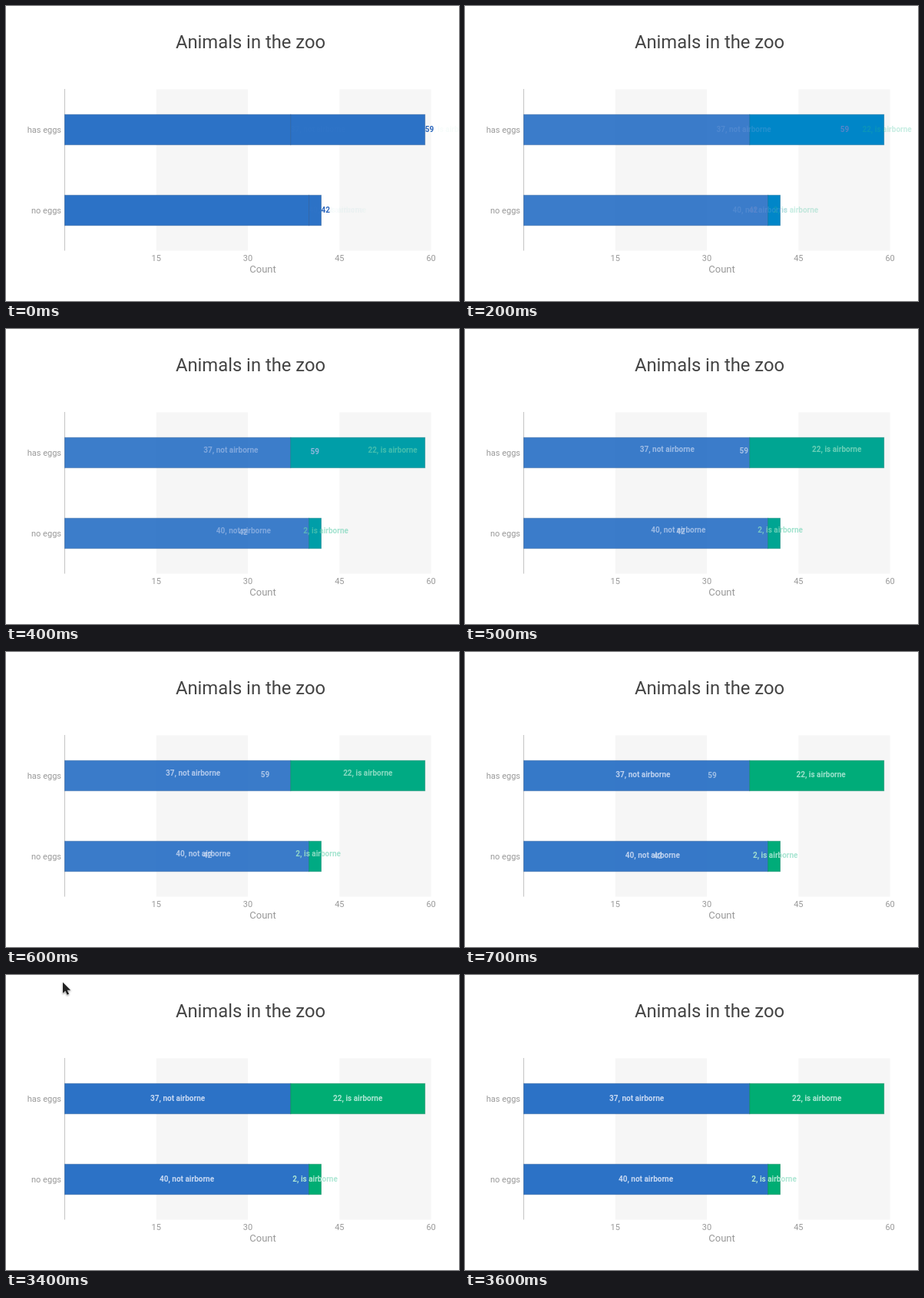
Recreate the animation shown at these times as an HTML page. Size 590 px wide and 384 px high, loop 4000 ms.

```html
<!DOCTYPE html>
<html lang="en">
<head>
<meta charset="utf-8">
<title>Animals in the zoo</title>
<style>
  html, body { margin: 0; width: 100%; height: 100%; overflow: hidden; background: #fff; }
  svg { display: block; width: 590px; height: 384px; font-family: Roboto, sans-serif; }
  .axis { font-size: 11px; fill: #999; text-anchor: middle; }
  .row { text-anchor: end; }
  .label { font-size: 10px; font-weight: 600; text-anchor: middle; }
  #bars { stroke-opacity: .5; }
  #cursor { filter: drop-shadow(.5px 1px .8px rgba(0, 0, 0, .4)); }
</style>
</head>
<body>
<svg viewBox="0 0 590 384">
  <rect width="590" height="384" fill="#fff"/>
  <g id="stripes" fill="#f6f6f6"></g>
  <path d="M76.5 108V318.5" stroke="#c4c4c4"/>
  <text x="318.5" y="55" font-size="23.8" fill="#444" text-anchor="middle">Animals in the zoo</text>
  <g id="axis" class="axis">
    <text x="334.5" y="347" font-size="13">Count</text>
  </g>
  <g id="bars"></g>
  <g id="labels"></g>
  <path id="cursor" d="M0 0V14.2L3.3 11.2L5.6 16.3L8.1 15.2L5.8 10.2H10.2Z"
        fill="#222" stroke="#fff" paint-order="stroke"/>
</svg>
<script>
const LOOP = 4000, STEP = 100, MOVE = 990, DURATION = 1294;
const BLUE = 'rgb(44 114 198)', GREEN = 'rgb(0 173 115)';
const BAND = 105, TOP = 108.5, BAR = 39.4;

const $ = id => document.getElementById(id);
const scaleX = count => 76.5 + count * 7.952;
const rowY = row => TOP + BAND * (row + .5);
const ease = p => p < .5 ? 4 * p ** 3 : 1 - 4 * (1 - p) ** 3;
const mix = (a, b, k, space = 'srgb') => `color-mix(in ${space}, ${a}, ${b} ${k * 100}%)`;

function add(parent, tag, attrs, text) {
  const el = document.createElementNS('http://www.w3.org/2000/svg', tag);
  for (const k in attrs) el.setAttribute(k, attrs[k]);
  if (text) el.textContent = text;
  $(parent).append(el);
  return el;
}

for (let n = 15; n <= 60; n += 15) {
  add('axis', 'text', { x: scaleX(n), y: 332 }, String(n));
  if (n % 30) {
    add('stripes', 'rect', { x: scaleX(n), y: TOP, width: scaleX(15) - scaleX(0), height: 2 * BAND });
  }
}

const bars = [], labels = [];

function addBar(row, from, to, green) {
  const x = scaleX(from), width = scaleX(to) - x;
  const el = add('bars', 'rect', { x, y: rowY(row) - BAR / 2, width, height: BAR });
  bars.push({ el, green });
}

// A label travels from just past the bar's end to its middle
function addLabel(row, from, to, text, style) {
  const el = add('labels', 'text', { class: 'label' }, text);
  const end = scaleX(to);
  labels.push({
    el, ...style,
    y: rowY(row) + 3.4,
    x0: end + el.getComputedTextLength() / 2,
    x1: (scaleX(from) + end) / 2
  });
}

const onBlue = { from: 'rgb(115 155 220)', to: 'rgb(200 217 242)', rise: 4 };
const onGreen = { from: 'rgb(0 175 125)', to: 'rgb(174 231 212)', rise: 4 };
const total = { from: 'rgb(44 102 189)', to: 'rgb(225 235 248)', rise: 2, fades: true };

const rows = [
  { name: 'has eggs', grounded: 37, airborne: 22 },
  { name: 'no eggs', grounded: 40, airborne: 2 }
];

rows.forEach(({ name, grounded, airborne }, row) => {
  const sum = grounded + airborne;
  add('axis', 'text', { class: 'row', x: 72, y: rowY(row) + 4 }, name);
  addBar(row, 0, grounded, false);
  addBar(row, grounded, sum, true);
  addLabel(row, 0, grounded, `${grounded}, not airborne`, onBlue);
  addLabel(row, grounded, sum, `${airborne}, is airborne`, onGreen);
  addLabel(row, 0, sum, String(sum), total);
});

function draw(t) {
  // The transition is already under way at the first step after the start
  const p = t ? Math.min(1, 1 - (MOVE - t) / DURATION) : 0;
  const k = ease(p);
  const lift = Math.sin(Math.PI * Math.min(1, t / 1000)) ** 4;

  for (const { el, green } of bars) {
    const fill = green ? mix(BLUE, GREEN, k, 'lch') : BLUE;
    el.style.fill = fill;
    el.style.stroke = mix(fill, 'black', .25);
    el.style.opacity = green ? 1 : 1 - .08 * Math.sin(Math.PI * p);
  }
  for (const { el, x0, x1, y, from, to, rise, fades } of labels) {
    el.setAttribute('x', x0 + (x1 - x0) * k);
    el.setAttribute('y', y - rise * lift);
    el.style.fill = mix(from, to, k);
    el.style.opacity = fades ? 1 - p ** 4 : .03 + .97 * k;
  }

  const late = t >= 3500;
  $('cursor').style.visibility = t >= 3400 && t < 3600 ? 'visible' : 'hidden';
  $('cursor').setAttribute('transform', late ? 'translate(72 10.5)' : 'translate(74 9.5)');
}

const start = performance.now();
function tick() {
  const t = (performance.now() - start) % LOOP;
  draw(Math.floor(t / STEP) * STEP);
  requestAnimationFrame(tick);
}
tick();
</script>
</body>
</html>
```
